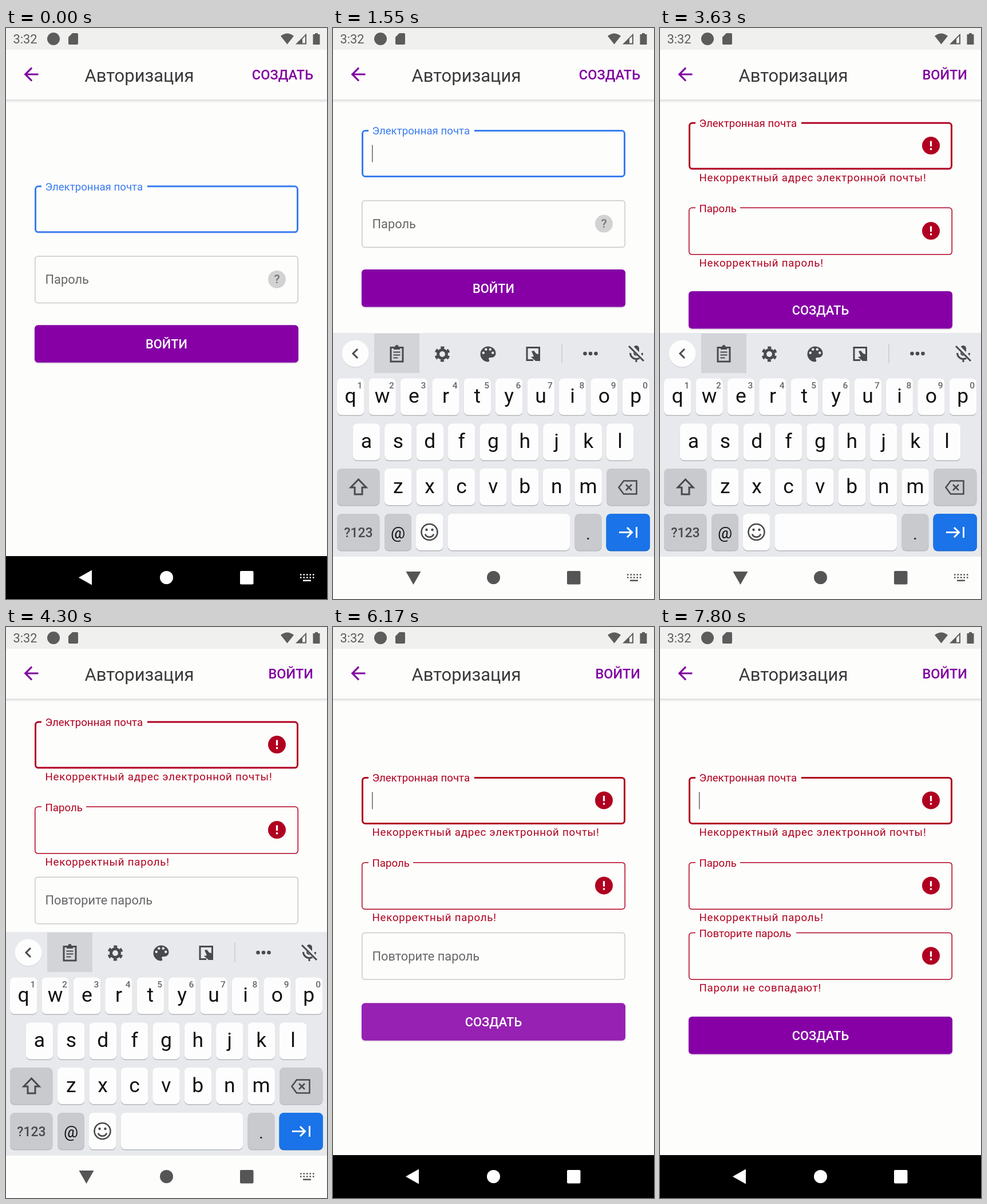
Recreate the animation shown at these times as an HTML page. Size 561 by 998 pixels, loop 8 s.

```html
<!DOCTYPE html>
<html lang="ru">
<head>
<meta charset="utf-8">
<style>
  html, body { margin: 0; width: 100%; height: 100%; overflow: hidden; background: #fdfdfc; }
  svg { display: block; width: 100vw; height: 100vh; font-family: Roboto, sans-serif; }
  .mid { text-anchor: middle; }
  .line { fill: none; stroke: #484a4d; stroke-width: 3; }
  .thin { stroke-width: 2; }
  .med { font-weight: 500; }
</style>
</head>
<body>
<svg viewBox="0 0 561 998" preserveAspectRatio="none">
  <defs>
    <linearGradient id="shade" x2="0" y2="1">
      <stop stop-color="#dedede"/><stop offset="1" stop-color="#fdfdfc"/>
    </linearGradient>
    <clipPath id="clip"><rect id="clipBox" width="561" height="923"/></clipPath>
  </defs>
  <rect width="561" height="998" fill="#fdfdfc"/>
  <g clip-path="url(#clip)"><g id="form"></g></g>

  <rect width="561" height="38" fill="#f0f0ee"/>
  <rect y="125" width="561" height="6" fill="url(#shade)"/>
  <g fill="#5c5c5c">
    <text x="12.500" y="27" font-size="21.8">3:32</text>
    <circle cx="83" cy="19" r="11"/>
    <path d="M116 9h8q2 0 2 2v16q0 2-2 2h-13q-2 0-2-2V16z"/>
    <path d="M480 14q11.500-9 23 0L491.500 28.500z"/>
    <path d="M506 28.500L525 9.500v19zM518 19v7.500h5V14z" fill-rule="evenodd"/>
    <path d="M540 11v-2h5v2h3.500v18H536.500V11z"/>
  </g>
  <path d="M20 11H7.830l5.590-5.590L12 4l-8 8 8 8 1.410-1.410L7.830 13H20z" fill="#8000a0" transform="translate(25.300 62.300) scale(1.558)"/>
  <text x="137.500" y="94" font-size="31" fill="#3a3a3a">Авторизация</text>
  <text id="mode" class="med" x="537" y="90" font-size="23.500" fill="#8000a0" text-anchor="end"></text>

  <rect y="923" width="561" height="75"/>
  <g id="board">
    <rect y="533" width="561" height="465" fill="#e7e9ec"/>
    <rect y="924" width="561" height="74" fill="#fdfdfc"/>
    <g id="keys"></g>
    <circle cx="39" cy="570" r="23.500" fill="#c9ccd0"/>
    <circle cx="39" cy="569" r="23.500" fill="#fdfdfd"/>
    <path id="chevron" class="line"/>
    <g id="tools">
      <rect x="72" y="534" width="79" height="69" fill="#d2d4d7"/>
      <path class="line" d="M101 558.500h21v24.500h-21z"/>
      <path class="line thin" d="M105.500 566.500h12M105.500 571.500h12M105.500 576.500h8"/>
      <path d="M106 557h2.500a3 3 0 0 1 6 0h2.500v5h-11z" fill="#484a4d"/>
      <circle class="line" cx="191" cy="570" r="7.500" style="stroke-width:5"/>
      <circle class="line" cx="191" cy="570" r="11.500" style="stroke-width:4" stroke-dasharray="6 6.043" stroke-dashoffset="-3"/>
      <g transform="translate(253 552) scale(1.500)" fill="#484a4d">
        <path d="M12 3a9 9 0 0 0 0 18c.83 0 1.500-.67 1.500-1.500 0-.39-.15-.74-.39-1.010-.23-.26-.38-.61-.38-.99 0-.83.67-1.500 1.500-1.500H16c2.760 0 5-2.240 5-5 0-4.420-4.030-8-9-8z"/>
        <g fill="#e7e9ec"><circle cx="6.500" cy="10.500" r="1.500"/><circle cx="9.500" cy="6.500" r="1.500"/><circle cx="14.500" cy="6.500" r="1.500"/><circle cx="17.500" cy="10.500" r="1.500"/></g>
      </g>
      <path class="line" d="M350 580.500h-11v-22h21.500v14"/>
      <path d="M347 565l4-1 4 5 7 2v11h-8l-8-7 5-1z" fill="#484a4d"/>
      <path d="M400 552v34" stroke="#c9ccd0" stroke-width="1.500"/>
      <g fill="#484a4d"><circle cx="440.500" cy="569" r="3.300"/><circle cx="450" cy="569" r="3.300"/><circle cx="459.500" cy="569" r="3.300"/></g>
    </g>
    <rect x="525" y="555" width="10" height="18" rx="5" fill="#484a4d"/>
    <path class="line" d="M519.500 568a10.500 10.500 0 0 0 21 0M530 578v6"/>
    <path d="M518 554l26 27" stroke="#e7e9ec" stroke-width="7"/>
    <path class="line" d="M517 556l26 26"/>
  </g>
  <g id="nav">
    <path id="back" d="M127 960.500L150 947.500v26z"/>
    <circle cx="280.500" cy="960.500" r="11.500"/>
    <rect x="409" y="949" width="23.500" height="23.500" rx="2"/>
    <g id="picker">
      <path d="M514 955.500h25M514 960.500h25" stroke-width="2.500" stroke-dasharray="2.500 3" fill="none"/>
      <rect x="519" y="964.500" width="14" height="2.500"/>
    </g>
  </g>
</svg>
<script>
const $ = id => document.getElementById(id);
const clamp = v => Math.max(0, Math.min(1, v));
const ramp = (t, start, len) => clamp((t - start) / len);
const smooth = p => .5 - Math.cos(Math.PI * p) / 2;
const RED = '#b00020', BLUE = '#3b7cf0', GREY = '#666';

// Keyboard
const STEP = 55.4;
const key = (x, y, w, fill, under = '#b4b7bb') =>
  `<rect x="${x}" y="${y + 1.5}" width="${w}" height="64" rx="8" fill="${under}"/>
   <rect x="${x}" y="${y}" width="${w}" height="64" rx="8" fill="${fill}"/>`;
const letter = (c, x, y, size = 35.5, fill = '#111', weight = 400) =>
  `<text class="mid" x="${x}" y="${y}" font-size="${size}" fill="${fill}" font-weight="${weight}">${c}</text>`;

function buildKeys() {
  const light = '#fdfdfd', dark = '#c8cace';
  let out = '';
  [['qwertyuiop', 7, 612.5], ['asdfghjkl', 34.7, 691.5], ['zxcvbnm', 90, 770]].forEach(([row, x0, y], r) => {
    [...row].forEach((c, i) => {
      const x = x0 + i * STEP;
      out += key(x, y, 47.5, light) + letter(c, x + 23.7, y + 42.5);
      if (!r) out += letter((i + 1) % 10, x + 40, y + 17, 15.5, '#666', 500);
    });
  });
  out += key(7, 770, 74.5, dark) + key(478, 770, 75.5, dark) + key(7, 849, 74.5, dark)
    + key(90, 849, 47, dark) + key(145, 849, 47.5, light) + key(200.5, 849, 213.5, light)
    + key(422.5, 849, 47, dark) + key(477.5, 849, 76.5, '#1a73e8', '#1a66cc')
    + letter('?123', 44.5, 890, 23, '#484a4d', 500)
    + letter('@', 113.5, 892, 28) + letter('.', 446, 894, 28)
    + `<path class="line" d="M44.500 789L31 803h7v12h13v-12h7z"/>
       <path class="line" d="M508 791.500h22.500v23H508L499.500 803zM512 798l10 10M522 798l-10 10" style="stroke-width:2.500"/>
       <circle class="line" cx="168.500" cy="881" r="14" style="stroke-width:2.600"/>
       <path class="line" d="M161 884.500a8 8 0 0 0 15 0" style="stroke-width:2.600"/>
       <circle cx="163.500" cy="877" r="2.200" fill="#484a4d"/><circle cx="173.500" cy="877" r="2.200" fill="#484a4d"/>
       <path class="line" d="M500 881.500h22M514 873l8.500 8.500-8.500 8.500M530.500 872v19" style="stroke:#fff"/>`;
  $('keys').innerHTML = out;
}

// Outlined text field; up: label raised 0..1, err: error message shown 0..1
function field(y, label, labelWidth, { up, err, focus, note, help, alpha = 1 }) {
  const sw = focus ? 3 : 1.5;
  const bad = err !== null;
  const tone = bad ? RED : focus ? BLUE : GREY;
  const edge = tone === GREY ? '#c9c9cb' : tone;
  const badge = fill => `<circle cx="473.500" cy="${y + 41}" r="15.500" fill="${fill}"/>`;
  let out = `<rect x="${50 + sw / 2}" y="${y + sw / 2}" width="${461 - sw}" height="${83 - sw}" rx="5" fill="none" stroke="${edge}" stroke-width="${sw}"/>
    <rect x="62" y="${y - 1}" width="${(labelWidth + 14) * up}" height="5" fill="#fdfdfc"/>
    <text x="68.500" y="${y + 49 - 40.7 * up}" font-size="${21.8 - 3.1 * up}" fill="${tone}">${label}</text>`;
  if (bad) {
    out += badge(RED) + `<path d="M473.500 ${y + 33}v9.500m0 3v3.200" stroke="#fff" stroke-width="3.200"/>
      <text x="68.500" y="${y + 98 + 5.3 * err}" font-size="18.700" letter-spacing=".750" fill="${RED}" opacity="${err}">${note}</text>`;
  } else if (help) {
    out += badge('#d2d2d2') + letter('?', 473.5, y + 48, 21, '#777', 500);
  }
  return `<g opacity="${alpha}">${out}</g>`;
}

function shake(t, start) {
  const stops = [0, 25, -25, 25, -25, 15, -15, 6, -6, 0];
  const p = smooth(ramp(t, start, 700)) * 9, i = Math.min(8, Math.floor(p));
  return .535 * (stops[i] + (stops[i + 1] - stops[i]) * (p - i));
}

const press = (t, at) => .16 * ramp(t, at, 100) * (1 - ramp(t, at + 180, 300));

function drawForm(t) {
  const open = t >= 90 && t < 5420;
  const bad = t >= 2600, bad2 = t >= 6295, create = t >= 3630;
  const e1 = bad ? smooth(ramp(t, 2600, 167)) : null;
  const e2 = bad2 ? smooth(ramp(t, 6295, 167)) : null;
  const emailY = bad ? 164.6 : 178, passY = bad ? 313.6 : 301;
  const buttonY = bad2 ? 583.7 : create ? 460 + 100 * smooth(ramp(t, 3690, 300)) : bad ? 460 : 422;
  const cursor = (Math.floor((t - 210) / 500) + (t < 2460 ? 0 : 1)) % 2 === 0;
  const dx = shake(t, 2600) + shake(t, 6295);

  let out = `<g transform="translate(${dx})">`
    + field(emailY, 'Электронная почта', 171, { up: 1, err: e1, focus: true, note: 'Некорректный адрес электронной почты!' })
    + field(passY, 'Пароль', 64, { up: e1 || 0, err: e1, note: 'Некорректный пароль!', help: true });
  if (create) out += field(436.4, 'Повторите пароль', 162,
    { up: e2 || 0, err: e2, note: 'Пароли не совпадают!', alpha: ramp(t, 3990, 300) });
  if (cursor) out += `<rect x="68" y="${emailY + 26.5}" width="1.500" height="30" fill="#666"/>`;
  out += `</g>
    <rect x="49.500" y="${buttonY + 1}" width="462" height="66.500" rx="6" fill="#e2dde5"/>
    <rect x="50" y="${buttonY}" width="461" height="65.500" rx="6" fill="#8600a6"/>
    <rect x="50" y="${buttonY}" width="461" height="65.500" rx="6" fill="#fff" opacity="${press(t, 2460) + press(t, 6090)}"/>`
    + letter(create ? 'СОЗДАТЬ' : 'ВОЙТИ', 280.5, buttonY + 41, 21.8, '#fff', 500);

  $('form').innerHTML = out;
  $('form').setAttribute('transform', `translate(0 ${open ? 0 : 97.3})`);
  $('clipBox').setAttribute('height', open ? 533 : 923);
  $('mode').textContent = create ? 'ВОЙТИ' : 'СОЗДАТЬ';
}

function drawBoard(t) {
  const closing = t >= 5380;
  const hidden = closing ? clamp(.56 + (t - 5380) / 220) : (1 - ramp(t, 50, 270)) ** 2;
  $('board').setAttribute('transform', `translate(0 ${390 * hidden})`);
  $('board').setAttribute('opacity', (1 - hidden) ** 2);
  $('tools').setAttribute('visibility', closing ? 'hidden' : 'visible');
  $('chevron').setAttribute('d', closing ? 'M35 561l8 8-8 8' : 'M43 561l-8 8 8 8');

  const shown = closing ? .7 * (1 - ramp(t, 5380, 150)) : ramp(t, 80, 240);
  const g = Math.round(255 - 170 * shown), tone = `rgb(${g},${g},${g})`;
  $('nav').setAttribute('fill', tone);
  $('picker').firstElementChild.setAttribute('stroke', tone);
  $('picker').setAttribute('visibility', closing ? 'hidden' : 'visible');
  const turn = smooth(ramp(t, 500, 200)) - smooth(ramp(t, 5420, 200));
  $('back').setAttribute('transform', `rotate(${-90 * turn} 140 960)`);
}

function frame(now) {
  const t = now % 8000;
  drawForm(t);
  drawBoard(t);
  requestAnimationFrame(frame);
}

buildKeys();
frame(0);
</script>
</body>
</html>
```
